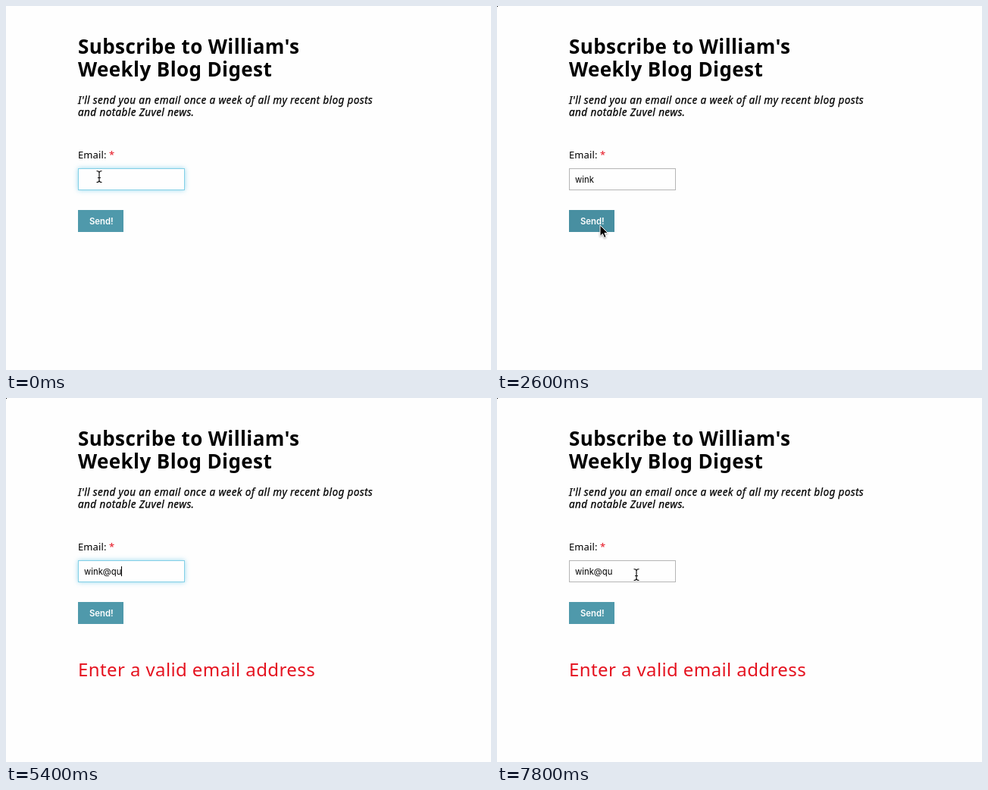
Write an HTML page that moves like this. It is 640 px wide and 480 px high and loops after 8000 ms.

```html
<!DOCTYPE html>
<html lang="en">
<head>
<meta charset="utf-8">
<title>Subscribe form</title>
<style>
  html, body { margin: 0; width: 100%; height: 100%; overflow: hidden; background: #fefefe; }
  svg { display: block; width: 640px; height: 480px; }
  text { font-family: "Noto Sans", sans-serif; letter-spacing: .4px; white-space: pre; }
  .title { font-size: 26px; font-weight: 700; }
  .intro { font-size: 13.5px; font-style: italic; stroke: #000; stroke-width: .25px; }
  .label { font-size: 13px; letter-spacing: .1px; }
  .red { fill: #e5121f; }
  .error { font-size: 24px; }
  .ui { font-family: Inter, sans-serif; font-size: 11.3px; letter-spacing: 0; }
  .send { font-weight: 600; fill: #fff; }
  .option { font-size: 13.2px; font-weight: 700; }
  #field { fill: #fefefe; stroke: #b5b5b5; }
  #field.focus { stroke: #82cfe6; filter: drop-shadow(0 0 3px #74cbe8c0); }
  #button { fill: #4f99ab; }
  #button.hover { fill: #488fa1; }
  #menu rect { fill: #fefefe; stroke: #a3c6e3; }
  #arrow { fill: #000; stroke: #fff; stroke-linejoin: round; filter: drop-shadow(0 1px 1px #0005); }
  #beam { fill: none; stroke: #111; stroke-width: 1.2; }
  [hidden] { display: none; }
</style>
</head>
<body>
<svg viewBox="0 0 640 480">
  <text class="title" x="95" y="63">Subscribe to William's</text>
  <text class="title" x="95" y="93">Weekly Blog Digest</text>
  <text class="intro" x="95" y="129">I'll send you an email once a week of all my recent blog posts</text>
  <text class="intro" x="95" y="145">and notable Zuvel news.</text>
  <text class="label" x="95" y="201">Email: <tspan class="red">*</tspan></text>

  <rect id="field" x="95.5" y="214.5" width="140" height="28"/>
  <text id="value" class="ui" x="103" y="233"></text>
  <rect id="caret" y="222" width="1" height="13"/>

  <rect id="button" x="95" y="269" width="60" height="29"/>
  <text class="ui send" x="110" y="288">Send!</text>
  <text id="error" class="error red" x="95" y="367">Enter a valid email address</text>

  <g id="menu"><rect x="95.5" y="243.5"/><g id="options"></g></g>
  <rect id="speck" width="1" height="1"/>

  <g id="cursor">
    <path id="arrow" d="M0 0V14.5L3.4 11.4 5.6 16.6 8.1 15.5 5.9 10.4H10.4Z"/>
    <path id="beam" d="M-3.5-7.5Q-.5-7.5 0-5.5Q.5-7.5 3.5-7.5M0-5.5V5.5M-3.5 7.5Q-.5 7.5 0 5.5Q.5 7.5 3.5 7.5M-2 1.5H2"/>
  </g>
</svg>
<script>
const LOOP = 8000, STEP = 200;
const $ = id => document.getElementById(id);
const show = (id, on) => $(id).toggleAttribute("hidden", !on);

const addresses = ["william@williamdrombe482.net", "wi", "wink@quelmorth.com"];

// Each track lists [start time, value]; a value holds until the next start.
const typed = [[0, ""], [200, "w"], [400, "wi"], [800, "win"], [1200, "wink"],
  [5000, "wink@"], [5200, "wink@q"], [5400, "wink@qu"]];
const focused = [[0, true], [2200, false], [4200, true], [5800, false]];
const caretOn = [[0, false], [200, true], [2200, false], [4400, true], [5800, false]];
const menuSize = [[0, 0], [200, 3], [800, 1], [2200, 0]];
const errorOn = [[0, false], [2800, true]];
const speckOn = [[0, false], [2000, true]];
const pointer = [[0, "beam"], [200, ""], [2000, "arrow"], [4000, "beam"], [4800, ""],
  [5800, "arrow"], [7400, "beam"]];

// Cursor waypoints: time, x, y
const route = [[0, 123, 225], [2000, 128, 262], [2400, 136, 289], [3800, 136, 289],
  [4200, 147, 227], [5600, 165, 290], [6000, 172, 306], [6400, 139, 287],
  [7000, 139, 287], [7600, 184, 233], [8000, 184, 233]];

const at = (track, t) => track.findLast(([start]) => start <= t)[1];

function cursorAt(t) {
  // The I-beam rests in the field while it is shown there between moves.
  if (at(pointer, t) === "beam" && t >= 4200 && t < 4800) return [147, 227];
  const next = route.findIndex(([time]) => time > t);
  const [t0, x0, y0] = route[next - 1], [t1, x1, y1] = route[next];
  const k = (t - t0) / (t1 - t0), ease = k * k * (3 - 2 * k);
  return [x0 + (x1 - x0) * ease, y0 + (y1 - y0) * ease];
}

function drawMenu(size) {
  show("menu", size);
  const box = $("menu").firstElementChild;
  box.setAttribute("width", size === 3 ? 223 : 160);
  box.setAttribute("height", 24 * size + 1);
  $("options").innerHTML = addresses.slice(3 - size).map((address, i) =>
    `<text class="ui option" x="104" y="${261.5 + 24 * i}">${address}</text>`).join("");
}

function draw(t) {
  const value = $("value");
  value.textContent = at(typed, t);
  $("caret").setAttribute("x", Math.round(103 + value.getComputedTextLength()));
  $("field").classList.toggle("focus", at(focused, t));
  show("caret", at(caretOn, t));
  show("error", at(errorOn, t));
  show("speck", at(speckOn, t));
  drawMenu(at(menuSize, t));

  const [x, y] = cursorAt(t), kind = at(pointer, t);
  $("cursor").setAttribute("transform", `translate(${x} ${y})`);
  show("arrow", kind === "arrow");
  show("beam", kind === "beam");
  $("button").classList.toggle("hover",
    kind === "arrow" && x > 95 && x < 155 && y > 269 && y < 298);
}

let last = -1;
function tick() {
  const t = Math.floor(performance.now() % LOOP / STEP) * STEP;
  if (t !== last) draw(last = t);
  requestAnimationFrame(tick);
}
tick();
</script>
</body>
</html>
```
